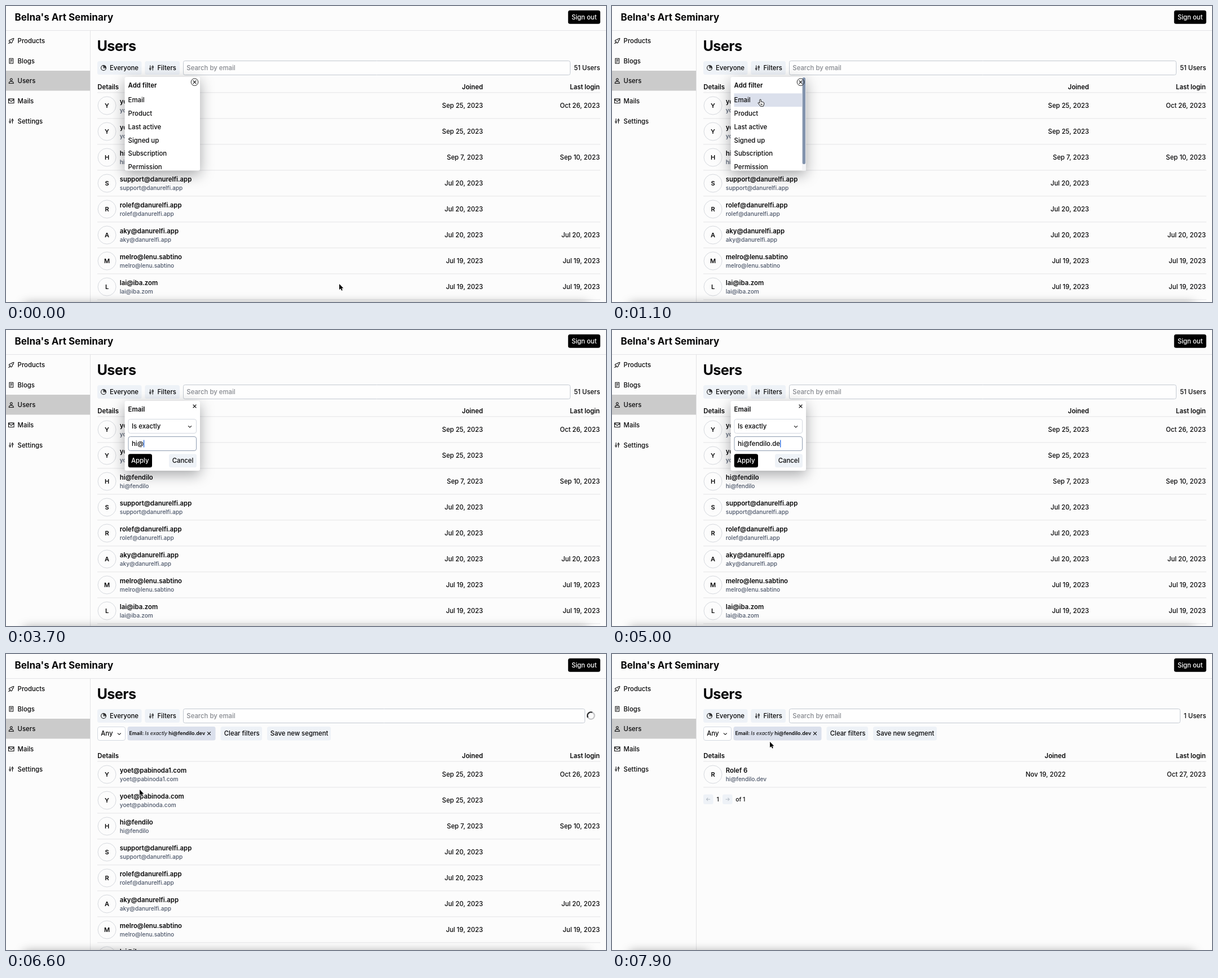
These frames come from a looping animation (1064x526 px, 8000 ms). An HTML page with a canvas:

```html
<!DOCTYPE html>
<html lang="en">
<head>
<meta charset="utf-8">
<title>Users</title>
<style>
html, body { margin: 0; width: 100%; height: 100%; overflow: hidden; background: #fcfcfc; }
canvas { display: block; width: 1064px; height: 526px; }
</style>
</head>
<body>
<canvas id="stage"></canvas>
<script>
const W = 1064, H = 526, LOOP = 8000, STEP = 100;
const canvas = document.getElementById('stage');
const ctx = canvas.getContext('2d');
const dpr = window.devicePixelRatio || 1;
canvas.width = W * dpr;
canvas.height = H * dpr;

const INK = '#060607', LINE = '#e4e4e6', SOFT = '#eef2f7', HOVER = '#dbe0ec', BORDER = '#d3d8e0';
const BASE = 11.35, SMALL = 10.1, REGULAR = 450, MEDIUM = 560;
const QUERY = 'hi@fendilo.dev';
const KEY_TIMES = [3100, 3300, 3600, 3900, 4000, 4100, 4300, 4400, 4500, 4600, 4700, 4800, 5000, 5200];
const MENU = ['Email', 'Product', 'Last active', 'Signed up', 'Subscription', 'Permission'];
const USERS = [
  ['yoet@pabinoda1.com', 'Sep 25, 2023', 'Oct 26, 2023'],
  ['yoet@pabinoda.com', 'Sep 25, 2023', ''],
  ['hi@fendilo', 'Sep 7, 2023', 'Sep 10, 2023'],
  ['support@danurelfi.app', 'Jul 20, 2023', ''],
  ['rolef@danurelfi.app', 'Jul 20, 2023', ''],
  ['aky@danurelfi.app', 'Jul 20, 2023', 'Jul 20, 2023'],
  ['melro@lenu.sabtino', 'Jul 19, 2023', 'Jul 19, 2023'],
  ['lai@iba.zom', 'Jul 19, 2023', 'Jul 19, 2023']
];

// Icons on a 15 unit grid
const ICONS = {
  rocket: 'M5 9.5L2 7.8 4.5 4.8H7C8.4 2.6 10.5 1.5 13.7 1.3 13.5 4.5 12.4 6.6 10.2 8v2.5L7.2 13 5.5 10zM4 10.5l-2.2 2.7L4.8 12M9.4 5.5h1',
  doc: 'M3 1.5h9v12H3zM5 4.5h5M5 7.5h5M5 10.5h3',
  person: 'M5 4.3a2.5 2.8 0 1 1 5 0a2.5 2.8 0 1 1-5 0M2 13.5c0-3.3 2.2-4.8 5.5-4.8s5.5 1.5 5.5 4.8z',
  mail: 'M1 2.5h13v10H1zM1 4l6.5 4.5L14 4',
  mixer: 'M4.5 1.5v6M4.5 11.5v2M10.5 1.5v2M10.5 7.5v6M2.7 9.5a1.8 1.8 0 1 0 3.6 0a1.8 1.8 0 1 0-3.6 0M8.7 5.5a1.8 1.8 0 1 0 3.6 0a1.8 1.8 0 1 0-3.6 0',
  pie: 'M1.5 7.5a6 6 0 1 0 12 0a6 6 0 1 0-12 0M7.5 2v5.5H13M8.5 3.5l3.5 3M10 3l2 2',
  chevron: 'M3.5 5.8l4 3.8 4-3.8',
  cross: 'M3.6 3.6l7.8 7.8M11.4 3.6l-7.8 7.8',
  left: 'M12 7.5H3M6.5 4L3 7.5 6.5 11',
  right: 'M3 7.5h9M8.5 4L12 7.5 8.5 11'
};
const ARROW = new Path2D('M0 0V10.2L2.4 8 4.1 11.8 5.8 11 4.2 7.4H7.4Z');
const HAND = new Path2D('M-1.1 1.2a1.2 1.2 0 0 1 2.4 0v3l1.6.1 1.8.4 1.4.7q.7.5.6 1.6l-.5 3-.9 2.2h-5l-2.4-3.2-1.9-2.4q0-1.4 1.6-.9l1.3 1.2z');

// Pointer path: time, x, y
const PATH = [
  [400, 591, 494], [600, 545, 438], [800, 402, 296], [1000, 276, 182], [1100, 263, 166], [1200, 264, 167],
  [2000, 264, 167], [2300, 278, 205], [2700, 278, 206],
  [5400, 278, 206], [5700, 262, 236], [5900, 241, 260], [6100, 236, 241], [6300, 237, 241],
  [6900, 237, 241], [7200, 290, 180], [7500, 360, 122], [7600, 366, 130], [7800, 321, 156], [7900, 280, 156]
];

function pointer(t) {
  const i = PATH.findIndex(k => k[0] > t);
  if (i === 0) return PATH[0].slice(1);
  if (i < 0) return PATH[PATH.length - 1].slice(1);
  const [t0, x0, y0] = PATH[i - 1], [t1, x1, y1] = PATH[i];
  const p = (t - t0) / (t1 - t0);
  return [x0 + (x1 - x0) * p, y0 + (y1 - y0) * p];
}

// Text is placed by the middle of its capital letters
function text(s, x, mid, { size = BASE, weight = REGULAR, color = INK, align = 'left', style = '', track = 0 } = {}) {
  ctx.font = `${style} ${weight} ${size}px Inter, sans-serif`;
  ctx.letterSpacing = track + 'px';
  ctx.textAlign = align;
  ctx.fillStyle = color;
  ctx.fillText(s, x, mid + size * 0.364);
  return ctx.measureText(s).width;
}

function box(x, y, w, h, r, fill, stroke) {
  ctx.beginPath();
  ctx.roundRect(x, y, w, h, r);
  if (fill) { ctx.fillStyle = fill; ctx.fill(); }
  if (stroke) { ctx.strokeStyle = stroke; ctx.lineWidth = 1; ctx.stroke(); }
}

function rule(x, y, w, h) {
  ctx.fillStyle = LINE;
  ctx.fillRect(x, y, w, h);
}

function icon(name, cx, cy, { size = 11, color = INK, width = 1.4 } = {}) {
  ctx.save();
  ctx.translate(cx - size / 2, cy - size / 2);
  ctx.scale(size / 15, size / 15);
  ctx.strokeStyle = color;
  ctx.lineWidth = width;
  ctx.stroke(new Path2D(ICONS[name]));
  ctx.restore();
}

function ring(x, y, r, color, width = 1, from = 0, to = 2 * Math.PI) {
  ctx.beginPath();
  ctx.arc(x, y, r, from, to);
  ctx.strokeStyle = color;
  ctx.lineWidth = width;
  ctx.stroke();
}

function drawShell() {
  ctx.fillStyle = '#fcfcfc';
  ctx.fillRect(0, 0, W, H);
  rule(0, 43, W, 1);
  rule(149, 43, 1, H);
  text("Belna's Art Seminary", 15.5, 20, { size: 17, weight: 700 });
  box(996.8, 7.8, 57, 24, 3.5, '#000');
  text('Sign out', 1025.2, 20, { color: '#fff', align: 'center' });

  ctx.fillStyle = '#cbcbcb';
  ctx.fillRect(0, 115, 149, 35.5);
  const nav = [['rocket', 'Products'], ['doc', 'Blogs'], ['person', 'Users'], ['mail', 'Mails'], ['mixer', 'Settings']];
  nav.forEach(([ic, label], i) => {
    const y = 62 + i * 35.6;
    icon(ic, 9.3, y);
    text(label, 20.6, y);
  });
  text('Users', 161.5, 71, { size: 25.2, weight: 700, track: -0.6 });
}

function drawToolbar(state, t) {
  box(162, 98, 78.5, 24, 3.5, SOFT);
  icon('pie', 173, 110);
  text('Everyone', 184, 110);
  box(246.3, 98, 61.7, 24, 3.5, SOFT);
  icon('mixer', 258, 110);
  text('Filters', 268.4, 110);

  const right = { open: 1000.5, loading: 1026.5, done: 1007.5 }[state];
  box(314.5, 97.5, right - 314.5, 25, 3, '#fefefe', '#c3c9d1');
  text('Search by email', 320.3, 110, { color: '#85888e' });
  if (state === 'loading') {
    const a = (t - 6600) / 1000 * 2 * Math.PI;
    ring(1037.3, 109.6, 6.3, '#c4c4c6', 2.2);
    ring(1037.3, 109.6, 6.3, '#2c2d30', 2.2, a + 2.6, a + 5.1);
  } else {
    text(state === 'done' ? '1 Users' : '51 Users', 1053.5, 110, { align: 'right' });
  }
}

function drawFilterBar() {
  box(162.5, 129.5, 49, 24, 3.5, '#fff', BORDER);
  text('Any', 168.3, 141.3);
  icon('chevron', 200.8, 141.8);
  box(215.5, 129, 156, 24.5, 3.5, HOVER);
  const size = 8.9;
  text('Email:', 218.5, 141, { size, weight: 600 });
  text('Is exactly', 246.3, 141, { size, style: 'italic' });
  text(QUERY, 288.3, 141, { size, weight: 600 });
  icon('cross', 360, 141.3);
  box(380.5, 129, 73.5, 24.5, 3.5, SOFT);
  text('Clear filters', 386.7, 141.3);
  box(463, 129, 113, 24.5, 3.5, SOFT);
  text('Save new segment', 468.8, 141.3);
}

function drawRow(name, mail, joined, last, y, joinX) {
  ring(179, y, 16, '#d6d9de');
  text(name[0].toUpperCase(), 179, y, { size: 11, weight: MEDIUM, align: 'center' });
  text(name, 201.8, y - 7.2, { weight: MEDIUM });
  text(mail, 201.8, y + 8.8, { size: SMALL, color: '#4b5568' });
  text(joined, joinX, y, { align: 'right' });
  text(last, 1053, y, { align: 'right' });
  rule(162, y + 22.4, 892, 1);
}

function drawTable(state) {
  const top = state === 'open' ? 144 : 181;
  const joinX = state === 'done' ? 804.5 : 845.8;
  text('Details', 162.3, top, { weight: MEDIUM });
  text('Joined', joinX, top, { weight: MEDIUM, align: 'right' });
  text('Last login', 1053, top, { weight: MEDIUM, align: 'right' });
  rule(162, top + 9.4, 892, 1);
  if (state !== 'done') {
    USERS.forEach(([mail, joined, last], i) => drawRow(mail, mail, joined, last, top + 33 + i * 46, joinX));
    return;
  }
  drawRow('Rolef 6', QUERY, 'Nov 19, 2022', 'Oct 27, 2023', top + 33, joinX);
  box(162, 249.5, 17.5, 17.5, 3, SOFT);
  icon('left', 170.8, 258.3, { color: '#b3bac4' });
  text('1', 187.6, 258.5, { size: 10.2, align: 'center' });
  box(196, 249.5, 17.5, 17.5, 3, SOFT);
  icon('right', 204.8, 258.3, { color: '#b3bac4' });
  text('of 1', 219.3, 258.5, { size: 10.2 });
}

function drawPanel(h) {
  ctx.save();
  ctx.shadowColor = 'rgba(14,18,22,.36)';
  ctx.shadowBlur = 24 * dpr;
  ctx.shadowOffsetY = 7 * dpr;
  box(210.5, 126, 133.5, h, 3, '#fff');
  ctx.restore();
}

const inside = ([x, y], x0, y0, x1, y1) => x >= x0 && x <= x1 && y >= y0 && y <= y1;

function drawMenu(t, p) {
  drawPanel(166.5);
  const over = inside(p, 210, 126, 344, 292);
  ctx.save();
  ctx.beginPath();
  ctx.rect(210, 126, 134, 166.5);
  ctx.clip();
  text('Add filter', 216.6, 140.5, { weight: 600 });
  MENU.forEach((label, i) => {
    const y = 167.2 + i * 23.75;
    if (over && Math.abs(p[1] - y) < 11.9) {
      ctx.fillStyle = HOVER;
      ctx.fillRect(216.5, y - 11.9, 121, 23.75);
    }
    text(label, 216.6, y);
  });
  if (over) {
    ctx.fillStyle = '#f3f4f6';
    ctx.fillRect(337, 126, 7, 167);
    box(337.7, 127, 5.4, 154, 2.5, '#8293ad');
  }
  ctx.restore();
  icon('cross', 334.5, 135.2);
  if (t < 1400) ring(334.5, 135.2, 6.3, '#222');
}

function drawForm(t, p) {
  drawPanel(124);
  text('Email', 216.6, 140.5, { weight: 600 });
  icon('cross', 334.5, 135.5, { width: 1.7 });
  box(217, 158.5, 120.5, 25, 3.5, '#fff', BORDER);
  text('Is exactly', 223, 171);
  icon('chevron', 326, 171.5);

  const hover = inside(p, 217, 189, 338, 215);
  box(217, 189.5, 120.5, 25, 3.5, '#fff', hover ? '#8e9bb0' : BORDER);
  const typed = QUERY.slice(0, KEY_TIMES.filter(k => k <= t).length);
  const w = text(typed, 223, 202);
  if (t >= 2700) {
    ctx.fillStyle = '#2f6fde';
    ctx.fillRect(223 + w, 195.5, 1.4, 13);
  }

  const hot = t > 5400 && inside(p, 217, 220, 259, 244.5);
  box(216.7, 220.3, 42.3, 24, 3.5, hot ? '#57657d' : '#000');
  text('Apply', 237.8, 232.3, { color: '#fff', align: 'center' });
  box(289, 220.3, 49, 24, 3.5, SOFT);
  text('Cancel', 313.5, 232.3, { align: 'center' });
}

function drawStatus(t) {
  if (t < 5800 || t >= 6300) return;
  ctx.save();
  ctx.globalAlpha = t < 6100 ? 1 : (6300 - t) / 400;
  box(-4, 512, 320, 18, 3, '#e6e6e8');
  const size = 8.7;
  const w = text('domain1.localsite.com', 4.5, 518.7, { size, color: '#6f7276' });
  text(':3000/dashboard/users/84Qff89mQapRou-bKKcaD', 4.5 + w, 518.7, { size, color: '#96999d' });
  ctx.restore();
}

function drawEdge() {
  ctx.save();
  ctx.shadowColor = 'rgba(0,0,0,.4)';
  ctx.shadowBlur = 18 * dpr;
  ctx.fillStyle = '#000';
  ctx.fillRect(32, 529, W - 64, 40);
  ctx.restore();
}

function drawPointer(t, p) {
  if (t >= 3000 && t < 5500) return;
  const inForm = t >= 2200 && t < 6400;
  const beam = inForm && inside(p, 217, 189, 338, 215);
  const hand = t < 1600 && inside(p, 210, 155, 337, 292)
    || inForm && (inside(p, 217, 220, 259, 244.5) || inside(p, 202, 255, 260, 269));
  ctx.save();
  ctx.translate(...p);
  ctx.lineJoin = 'round';
  if (beam) {
    const d = new Path2D('M-2.2-5.5Q0-5.5 0-4V4Q0 5.5-2.2 5.5M2.2-5.5Q0-5.5 0-4M0 4Q0 5.5 2.2 5.5M-1.2 2.2H1.2');
    ctx.strokeStyle = '#fff';
    ctx.lineWidth = 2.2;
    ctx.stroke(d);
    ctx.strokeStyle = '#111';
    ctx.lineWidth = 1;
    ctx.stroke(d);
  } else if (hand) {
    ctx.fillStyle = '#fff';
    ctx.strokeStyle = '#111';
    ctx.lineWidth = 1;
    ctx.fill(HAND);
    ctx.stroke(HAND);
    ctx.stroke(new Path2D('M1.2 7.5v2.5M3 7.5v2.5'));
  } else {
    ctx.strokeStyle = '#fff';
    ctx.lineWidth = 1.6;
    ctx.stroke(ARROW);
    ctx.fillStyle = '#000';
    ctx.fill(ARROW);
  }
  ctx.restore();
}

function draw(t) {
  const state = t < 6400 ? 'open' : t < 6800 ? 'loading' : 'done';
  const p = pointer(t);
  ctx.setTransform(dpr, 0, 0, dpr, 0, 0);
  drawShell();
  drawToolbar(state, t);
  if (state !== 'open') drawFilterBar();
  drawTable(state);
  if (t < 1600) drawMenu(t, p);
  else if (state === 'open') drawForm(t, p);
  drawEdge();
  drawStatus(t);
  drawPointer(t, p);
}

function tick(now) {
  draw(Math.floor(now % LOOP / STEP) * STEP);
  requestAnimationFrame(tick);
}
requestAnimationFrame(tick);
</script>
</body>
</html>
```
